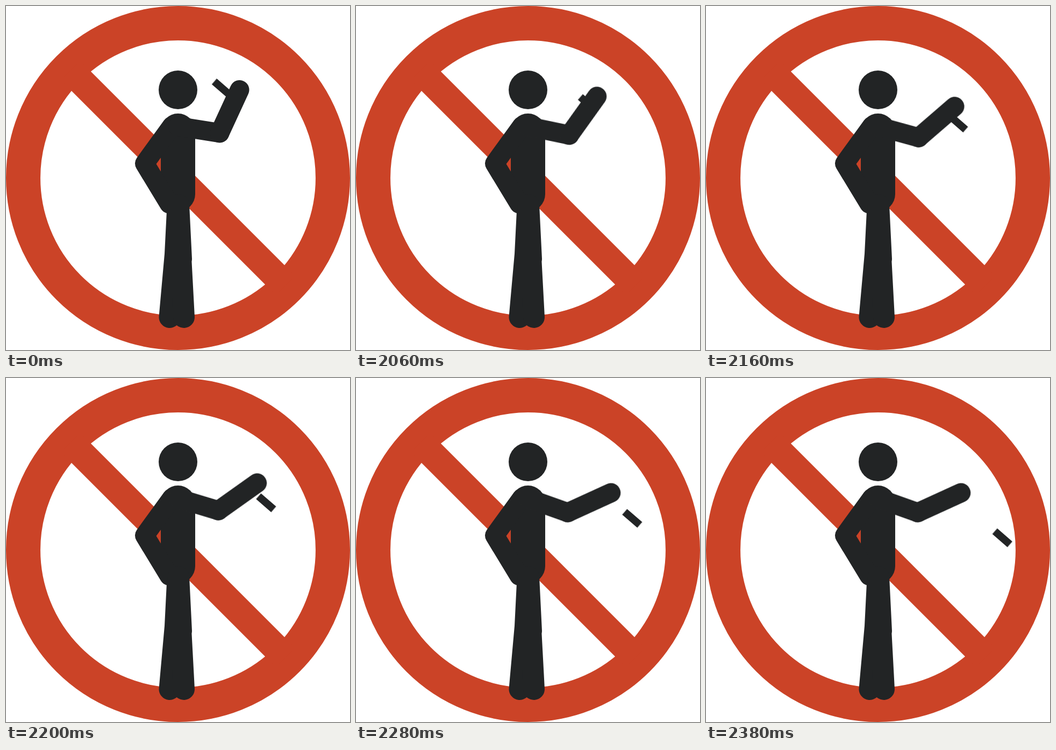
Recreate the animation shown at these times as an HTML page without scripts. Size 640x640 px, loop 3 s.

```html
<!DOCTYPE html>
<html lang="en">
<head>
<meta charset="utf-8">
<title>No littering</title>
<style>
  html, body { margin: 0; width: 100%; height: 100%; overflow: hidden; background: #fff; }
  svg { display: block; width: 100%; height: 100%; }

  .sign { fill: none; stroke: #cb4327; }
  .person { fill: #222425; stroke: #222425; stroke-linecap: round; stroke-linejoin: round; }
  .solid { stroke: none; }
  .limb { fill: none; stroke-width: 36px; }
  .leg { fill: none; stroke-width: 40px; }

  .arm, .forearm, .butt { animation: 3s linear infinite; }
  .arm { transform-origin: 320px 224px; animation-name: lower-arm; }
  .forearm { transform-origin: 397.5px 236.3px; animation-name: flick; }
  .butt { animation-name: toss; }

  /* Rest for two seconds, then move in 20 ms steps. */
  @keyframes lower-arm {
    0% { transform: rotate(0deg); }
    66.66% { transform: rotate(0deg); animation-timing-function: steps(15, start); }
    76.66%, 100% { transform: rotate(10.6deg); }
  }
  @keyframes flick {
    0% { transform: rotate(0deg); }
    66.66% { transform: rotate(0deg); animation-timing-function: steps(15, start); }
    76.66%, 100% { transform: rotate(30.1deg); }
  }
  @keyframes toss {
    0% { transform: translate(0, 0); }
    66.66% { transform: translate(0, 0); animation-timing-function: steps(20, start); }
    79.99%, 100% { transform: translate(149.8px, 144.7px); }
  }
</style>
</head>
<body>
<svg viewBox="0 0 640 640">
  <g class="sign">
    <circle cx="320" cy="320" r="288" stroke-width="64"/>
    <path d="M120 120L520 520" stroke-width="51"/>
  </g>
  <g class="person">
    <circle class="solid" cx="320" cy="156" r="36"/>
    <rect class="solid" x="288" y="200" width="64" height="182" rx="32"/>
    <path class="limb" d="M308 224L258 293L303.5 368"/>
    <path class="leg" d="M319.3 376L315 462L304.5 579"/>
    <path class="leg" d="M321 370L326 471M325.2 471L331 579"/>
    <g class="arm">
      <path class="limb" d="M320 224L397.5 236.3"/>
      <path class="limb forearm" d="M397.5 236.3L434.5 156"/>
    </g>
    <g class="butt">
      <rect class="solid" x="-18.6" y="-7" width="37.2" height="14" transform="translate(401.5 152.6) rotate(41)"/>
    </g>
  </g>
</svg>
</body>
</html>
```
